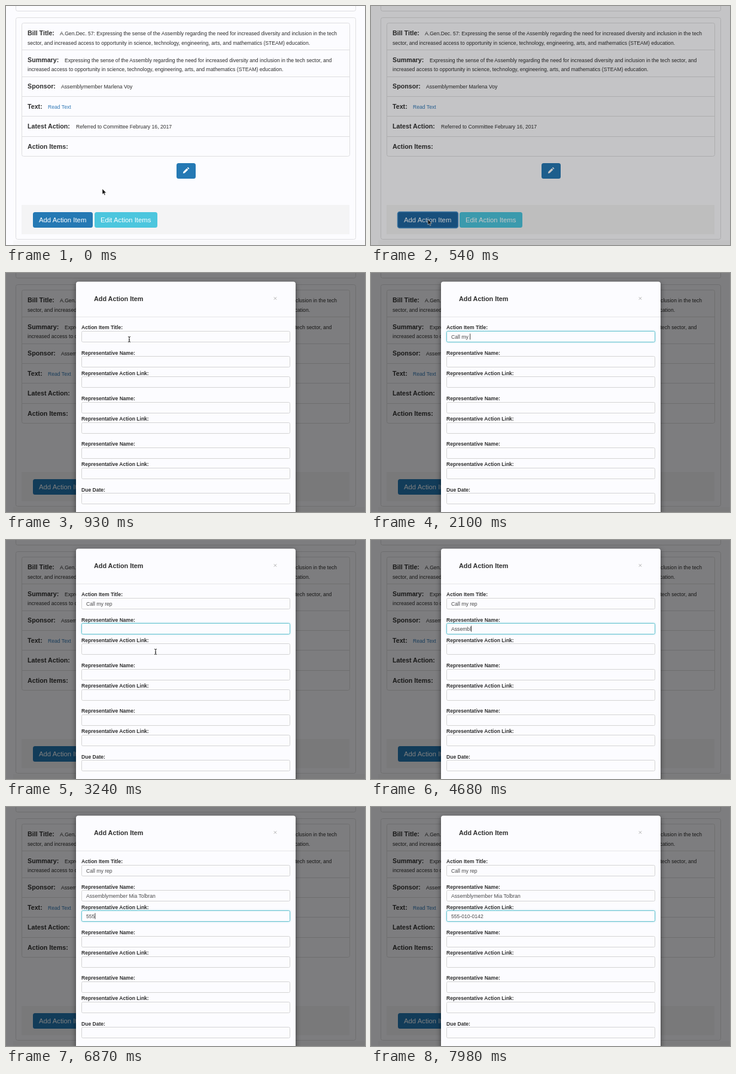
These frames come from a looping animation (600 by 400 pixels, 8000 ms). An HTML page:

```html
<!DOCTYPE html>
<html lang="en">
<head>
<meta charset="utf-8">
<title>Add Action Item</title>
<style>
html, body { margin: 0; width: 100%; height: 100%; overflow: hidden; background: #fcfcff; }
svg { display: block; width: 600px; height: 400px; font-family: "Liberation Sans", Arial, sans-serif; }
text { fill: #2e2e2e; font-size: 8.65px; white-space: pre; }
.head { font-size: 10.7px; font-weight: 700; }
.label { font-size: 8.55px; font-weight: 700; }
.btn { font-size: 11.33px; fill: #fff; }
.link { fill: #337ab7; }
.value { fill: #4a4a4a; }
.line { fill: none; stroke: #dedee0; }
.backdrop { animation: backdrop 8s linear infinite; }
.primary { fill: #2579b4; }
.info { fill: #4cc6de; }
.pressed { fill: #1f659f; stroke: #4a93cc; stroke-width: 1.5; animation: pressed 8s step-end infinite; }
.modal { filter: drop-shadow(0 3px 4.5px rgba(0, 0, 0, .5)); animation: slide 8s linear infinite; }
.input { fill: #fcfcff; stroke: #d4d4d4; }
.input.focus { stroke: #66c3d0; filter: drop-shadow(0 0 1.5px #a5dce6); }
.mouse { animation: mouse 8s ease-in-out infinite; }
@keyframes backdrop {
  0%, 6.06% { opacity: 0; }
  7.63%, 100% { opacity: .5; }
}
@keyframes pressed {
  0% { opacity: 0; }
  5.5% { opacity: 1; }
  7.63%, 100% { opacity: 0; }
}
@keyframes slide {
  0%, 7.63% { transform: translateY(-120px); opacity: 0; animation-timing-function: ease-out; }
  10.2%, 100% { transform: none; opacity: 1; }
}
@keyframes mouse {
  0%, .8% { transform: translate(161px, 306px); }
  4.5%, 7% { transform: translate(95px, 357px); }
  11.4%, 30% { transform: translate(206px, 111px); }
  32.5%, 34% { transform: translate(248px, 150px); }
  38.5%, 100% { transform: translate(250px, 187px); }
}
</style>
</head>
<body>
<svg viewBox="0 0 600 400">
  <rect width="600" height="400" fill="#fcfcff"/>
  <rect x="12" y="392" width="588" height="8" fill="#f8f8fa"/>
  <g id="page"></g>
  <g id="actions">
    <rect x="26" y="333" width="548" height="49" fill="#f4f4f5"/>
    <rect class="primary" x="285" y="263" width="32" height="26" rx="3.5"/>
    <path d="M295.8 280.3l.7-3 5.6-5.6 2.3 2.3-5.6 5.6zM302.9 270.9l1.2-1.2 2.3 2.3-1.2 1.2z" fill="#fff"/>
    <rect class="primary" x="45" y="345" width="100" height="26" rx="3.5"/>
    <rect class="pressed" x="44.5" y="344.5" width="101" height="27" rx="3.5"/>
    <rect class="info" x="148" y="345" width="105" height="26" rx="3.5"/>
    <text class="btn" x="55" y="362">Add Action Item</text>
    <text class="btn" x="158" y="362">Edit Action Items</text>
  </g>
  <rect class="backdrop" width="600" height="400"/>
  <g class="modal">
    <rect x="117" y="14.5" width="367" height="540" rx="4" fill="#fcfcff"/>
    <path d="M117 73.5H484" stroke="#e6e6e8"/>
    <path d="M447.8 40.3l4.4 4.4m0-4.4l-4.4 4.4" stroke="#b0b0b0"/>
    <text x="147" y="47.3" style="font-size:10.8px;font-weight:700">Add Action Item</text>
    <g id="form"></g>
    <path id="squiggle" d="M134 152.3h69" stroke="#d8594c" stroke-dasharray="1.5 1"/>
    <rect id="caret" width="1" height="10" fill="#444"/>
  </g>
  <g class="mouse">
    <path id="arrow" d="M0 0V9.2L2.1 7.3 3.6 10.7 5 10.1 3.6 6.8H6.6Z" fill="#111" stroke="#fff" stroke-width=".5"/>
    <path id="beam" d="M-2-4.5q2 0 2 1.5 0-1.5 2-1.5M0-3V3M-2 4.5q2 0 2-1.5 0 1.5 2 1.5M-1 .8h2" fill="none" stroke="#222"/>
  </g>
</svg>
<script>
const LOOP = 8000, CARET_BLINK = 500;
const byId = id => document.getElementById(id);

function add(parent, tag, attrs, content = '') {
  const node = document.createElementNS('http://www.w3.org/2000/svg', tag);
  for (const key in attrs) node.setAttribute(key, attrs[key]);
  node.textContent = content;
  parent.append(node);
  return node;
}
const label = (parent, x, y, cls, content) => add(parent, 'text', { x, y, class: cls }, content);

// Bill details
const page = byId('page');
const box = (x, y, width, height) => add(page, 'rect', { x, y, width, height, rx: 3, class: 'line' });
box(16.5, -10, 568, 18.5);
box(16.5, 19.5, 568, 371);
box(26.5, 28.5, 548, 223);
for (const y of [73.5, 118.5, 151.5, 184.5, 218.5]) add(page, 'path', { d: `M26.5 ${y}h548`, class: 'line' });

const topic = 'the sense of the Assembly regarding the need for increased diversity and inclusion in the tech';
const goal = 'increased access to opportunity in science, technology, engineering, arts, and mathematics (STEAM) education.';
const rows = [
  [49.3, 'Bill Title:', 90, 'A.Gen.Dec. 57: Expressing ' + topic],
  [94, 'Summary:', 98, `Expressing ${topic} sector, and`],
  [138.3, 'Sponsor:', 92, 'Assemblymember Marlena Voy'],
  [171.8, 'Text:', 70, 'Read Text', 'link'],
  [205.3, 'Latest Action:', 117, 'Referred to Committee February 16, 2017'],
  [238.5, 'Action Items:', 117, '']
];
for (const [y, name, x, value, cls = ''] of rows) {
  label(page, 36, y, 'head', name);
  label(page, x, y, cls, value);
}
label(page, 36, 64.8, '', 'sector, and ' + goal);
label(page, 36, 109.3, '', goal);

// Form fields: label baseline and caption
const pair = y => [[y, 'Representative Name:'], [y + 34, 'Representative Action Link:']];
const fields = [[94.3, 'Action Item Title:'], ...pair(136.7), ...pair(213), ...pair(289.3), [365.5, 'Due Date:']]
  .map(([y, caption]) => {
    label(byId('form'), 126, y, 'label', caption);
    const top = Math.floor(y) + 3.5;
    const input = add(byId('form'), 'rect', { x: 126.5, y: top, width: 348, height: 18, rx: 2, class: 'input' });
    return { input, top, text: label(byId('form'), 134, top + 12, 'value', '') };
  });

const typing = [
  { value: 'Call my rep', focus: 1050, start: 1500, step: 85 },
  { value: 'Assemblymember Mia Tolbran', focus: 2650, start: 4160, step: 80 },
  { value: '555-010-0142', focus: 6400, start: 6700, step: 58 }
];
const show = (id, on) => byId(id).setAttribute('visibility', on ? 'visible' : 'hidden');

function render(t) {
  const active = typing.findLastIndex(entry => t >= entry.focus);
  let caretOn = false;
  typing.forEach(({ value, focus, start, step }, i) => {
    const { input, text, top } = fields[i];
    const count = Math.max(0, Math.min(value.length, Math.floor((t - start) / step) + 1));
    text.textContent = value.slice(0, count);
    input.classList.toggle('focus', i === active);
    if (i !== active) return;
    const lastKey = count ? start + (count - 1) * step : focus;
    caretOn = Math.floor((t - lastKey) / CARET_BLINK) % 2 === 0;
    byId('caret').setAttribute('x', 134 + (count ? text.getComputedTextLength() : 0));
    byId('caret').setAttribute('y', top + 4);
  });
  show('caret', caretOn);
  show('squiggle', active === 1 && t >= typing[1].start + 14 * typing[1].step);
  show('arrow', t < 780);
  show('beam', (t >= 780 && t < 1500) || (t >= 2400 && t < 4160));
}

let origin;
function tick(now) {
  origin ??= now;
  render((now - origin) % LOOP);
  requestAnimationFrame(tick);
}
render(0);
requestAnimationFrame(tick);
</script>
</body>
</html>
```
